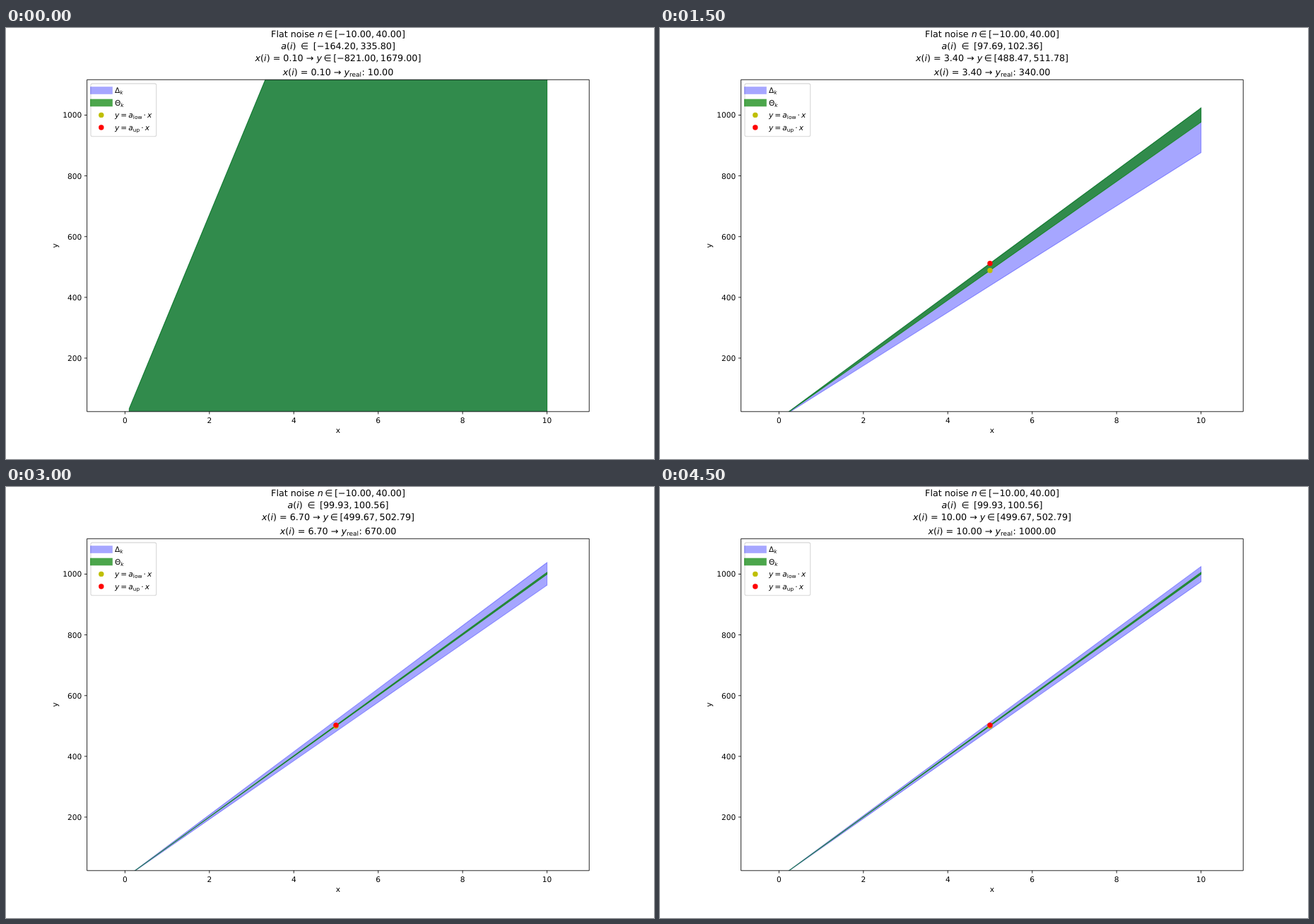
Animation of 917 by 611 pixels, one loop 5000 ms. Source, as an HTML page:

```html
<!DOCTYPE html>
<html lang="en">
<head>
<meta charset="utf-8">
<title>Slope interval estimation</title>
<style>
  html, body { margin: 0; width: 100%; height: 100%; overflow: hidden; background: #fff; }
  svg { display: block; width: 100vw; height: 100vh; }
  text { font: 10.61px "DejaVu Sans", sans-serif; text-rendering: geometricPrecision; white-space: pre; }
  .mid { text-anchor: middle; }
  .end { text-anchor: end; }
  .title { font-size: 12.73px; text-anchor: middle; }
  .it { font-style: italic; }
  .sub { font-size: 70%; }
  .axis { fill: none; stroke: #000; stroke-width: .85; }
  .band { stroke-width: 1.06; }
  .delta { fill: #00f; stroke: #00f; fill-opacity: .35; stroke-opacity: .35; }
  .theta { fill: #008000; stroke: #008000; fill-opacity: .7; stroke-opacity: .7; }
  .low { fill: #bfbf00; }
  .up { fill: #f00; }
</style>
</head>
<body>
<svg viewBox="0 0 917 611">
  <clipPath id="plot"><rect x="114.6" y="73.3" width="710.7" height="470.5"/></clipPath>
  <g clip-path="url(#plot)">
    <path id="delta" class="band delta"/>
    <path id="theta" class="band theta"/>
    <circle id="low" class="low" r="3.7"/>
    <circle id="up" class="up" r="3.7"/>
  </g>
  <g id="axes"></g>
  <g id="legend"></g>
  <g id="titles"></g>
</svg>
<script>
const STEP_MS = 500, NOISE_SPAN = 50, PROBE_X = 5;
// Lower slope bound of each measurement; the upper one lies NOISE_SPAN / x above it.
const lowSlopes = [-164.2, 88.312, 97.694, 87.65, 89.447, 99.934, 96.35, 96.6, 99.3, 97.5];

const get = id => document.getElementById(id);
const px = x => 168.4 + 59.72 * x;
const py = y => 554.1 - 0.4306 * y;
const fmt = v => v.toFixed(2).replace("-", "−");

const it = s => `<tspan class="it">${s}</tspan>`;
const gap = s => `<tspan dx=".2em">${s}</tspan>`;
const spaced = (sign, next) => gap(sign) + gap(next);
const sub = (s, cls = "") => `<tspan class="sub ${cls}" dy="2">${s}</tspan>`;
const raised = (s, dx = 0) => `<tspan dx="${dx}" dy="-2">${s}</tspan>`;
const range = ([lo, hi]) => `${fmt(lo)},${gap(fmt(hi) + "]")}`;
const text = (x, y, cls, s) => `<text x="${x}" y="${y}" class="${cls}">${s}</text>`;

const steps = [];
let theta = [-Infinity, Infinity];
lowSlopes.forEach((lo, i) => {
  const x = 0.1 + 1.1 * i;
  const delta = [lo, lo + NOISE_SPAN / x];
  theta = [Math.max(theta[0], delta[0]), Math.min(theta[1], delta[1])];
  steps.push({ x, delta, theta });
});

function drawAxes() {
  let ticks = "", labels = "";
  for (let x = 0; x <= 10; x += 2) {
    ticks += `M${px(x)} 543.8v3.7`;
    labels += text(px(x), 559.6, "mid", x);
  }
  for (let y = 200; y <= 1000; y += 200) {
    ticks += `M114.6 ${py(y)}h-3.7`;
    labels += text(107.2, py(y) + 3.9, "end", y);
  }
  get("axes").innerHTML =
    `<path class="axis" d="M114.6 73.3H825.3V543.8H114.6Z${ticks}"/>` + labels +
    text(470, 574, "mid", "x") +
    `<text class="mid" transform="translate(73.3 308.6) rotate(-90)">y</text>`;
}

function drawLegend() {
  const patch = (y, cls) => `<rect class="${cls}" stroke="none" style="stroke:none" x="119" y="${y - 5.3}" width="31.8" height="10.6"/>`;
  const dot = (y, cls) => `<circle class="${cls}" cx="134.8" cy="${y}" r="3.7"/>`;
  const line = name => it("y") + spaced("=", it("a")) + sub(name) + raised("·", 2.1) + gap(it("x"));
  get("legend").innerHTML =
    `<rect x="120" y="78.9" width="92.7" height="74.8" rx="2.1" fill="#fff" fill-opacity=".8" stroke="#ccc" stroke-opacity=".8" stroke-width="1.06"/>` +
    patch(88.5, "delta") + patch(106, "theta") + dot(123.4, "low") + dot(141, "up") +
    text(153.9, 92.2, "", "Δ" + sub("k", "it")) +
    text(153.9, 109.7, "", "Θ" + sub("k", "it")) +
    text(153.9, 127.1, "", line("low")) +
    text(153.9, 144.7, "", line("up"));
}

function bandPath([lo, hi]) {
  const at = (x, slope) => `${px(x)} ${py(slope * x)}`;
  return `M${at(0.1, lo)}L${at(10, lo)}L${at(10, hi)}L${at(0.1, hi)}Z`;
}

function drawStep({ x, delta, theta }) {
  const probe = theta.map(slope => slope * PROBE_X);
  get("delta").setAttribute("d", bandPath(delta));
  get("theta").setAttribute("d", bandPath(theta));
  ["low", "up"].forEach((id, i) => {
    get(id).setAttribute("cx", px(PROBE_X));
    get(id).setAttribute("cy", py(probe[i]));
  });

  const input = `${it("x")}(${it("i")}) = ${fmt(x)} → ${it("y")}`;
  const lines = [
    [13, "Flat noise " + it("n") + spaced("∈", "[" + range([-10, 40]))],
    [29.8, `${it("a")}(${it("i")}) ` + spaced("∈", " [" + range(theta))],
    [47.3, input + spaced("∈", "[" + range(probe))],
    [66.9, input + sub("real") + raised(": " + fmt(100 * x), 0.6)]
  ];
  get("titles").innerHTML = lines.map(([y, s]) => text(470, y, "title", s)).join("");
}

let shown = -1;
const start = performance.now();
function tick() {
  const index = Math.floor((performance.now() - start) / STEP_MS) % steps.length;
  if (index !== shown) drawStep(steps[shown = index]);
  requestAnimationFrame(tick);
}

drawAxes();
drawLegend();
tick();
</script>
</body>
</html>
```
